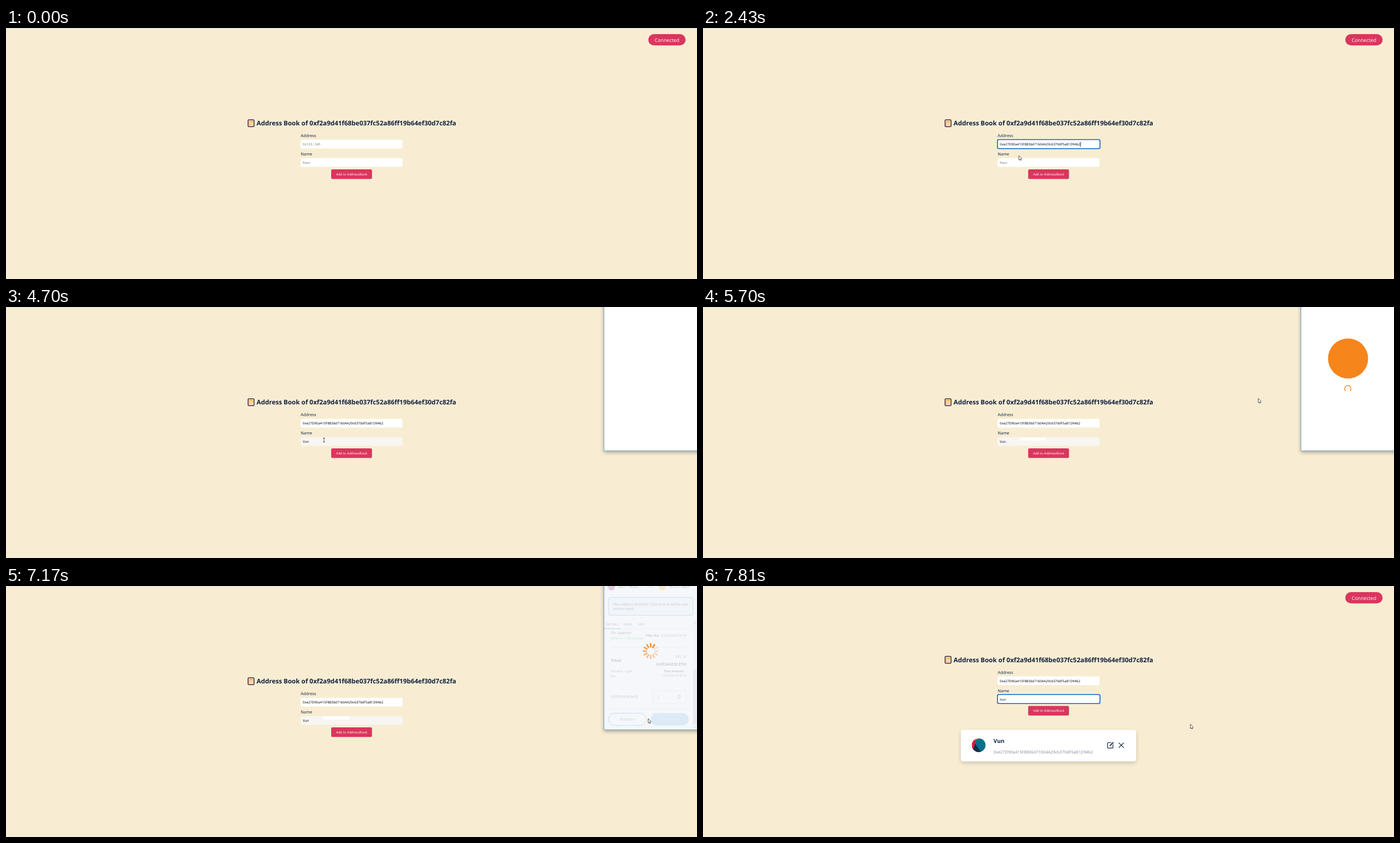
An HTML page with a canvas that plays this animation: 1241 by 451 pixels, repeating every 8 s.

```html
<!DOCTYPE html>
<html lang="en">
<head>
<meta charset="utf-8">
<title>Address book</title>
<style>
  html, body { margin: 0; width: 100%; height: 100%; overflow: hidden; background: #f8edd3; }
  canvas { display: block; }
</style>
</head>
<body>
<canvas id="stage" width="1241" height="451"></canvas>
<script>
const ctx = document.getElementById('stage').getContext('2d');
ctx.textRendering = 'geometricPrecision';

const LOOP = 8000;
const PAGE_FONT = '"Open Sans", sans-serif';
const WALLET_FONT = 'Lato, sans-serif';
const NAVY = '#11213f', PINK = '#da365e', BLUE = '#037dd6', ORANGE = '#f6851b';
const INK = '#24292e', GRAY = '#535a61', LINE = '#d0d3d7';
const OWNER = '0xf2a9d41f68be037fc52a86ff19b64ef30d7c82fa';
const CONTACT = '0xe27D90a415F8836d71b04A29c6370dF5a81D94b2';
const NAME = 'Vun';

const AT = {
  pointer: 1340, focusAddress: 2020, paste: 2290, focusName: 2700, type: 3690,
  submit: 4700, splash: 4850, leaveField: 5130, confirm: 5980, scroll: 6120,
  busy: 6900, close: 7320, added: 7650
};
const KEY_GAP = 150, BLINK = 540;

// Each glide eases the pointer to (x, y).
const GLIDES = [
  { from: 1480, to: 2020, x: 560, y: 208 },
  { from: 2290, to: 2430, x: 567, y: 229 },
  { from: 2430, to: 2700, x: 571, y: 235 },
  { from: 4990, to: 5700, x: 997, y: 164 },
  { from: 5700, to: 6510, x: 1188, y: 224 },
  { from: 6900, to: 7170, x: 1153, y: 238 },
  { from: 7170, to: 7810, x: 875, y: 248 }
];

const between = (t, a, b) => t >= a && t < b;

function ease(t, from, to) {
  const k = Math.max(0, Math.min(1, (t - from) / (to - from)));
  return k * k * (3 - 2 * k);
}

function pointerAt(t) {
  return GLIDES.reduce((p, g) => {
    const k = ease(t, g.from, g.to);
    return { x: p.x + (g.x - p.x) * k, y: p.y + (g.y - p.y) * k };
  }, { x: 161, y: 148 });
}

function at(x, y, paint) {
  ctx.save();
  ctx.translate(x, y);
  paint();
  ctx.restore();
}

// y is the middle of the capital letters
function text(str, x, y, size, color = NAVY, { weight = '', align = 'left', family = PAGE_FONT } = {}) {
  ctx.font = `${weight} ${size}px ${family}`;
  ctx.textAlign = align;
  ctx.fillStyle = color;
  ctx.fillText(str, x, y + size * 0.36);
}

function paintPath(fill, stroke, width = 1) {
  if (fill) { ctx.fillStyle = fill; ctx.fill(); }
  if (stroke) { ctx.strokeStyle = stroke; ctx.lineWidth = width; ctx.stroke(); }
}

function box(x, y, w, h, r, fill, stroke, width) {
  ctx.beginPath();
  ctx.roundRect(x, y, w, h, r);
  paintPath(fill, stroke, width);
}

function shadowBox(x, y, w, h, r, alpha, blur, dy) {
  ctx.save();
  ctx.shadowColor = `rgba(0,0,0,${alpha})`;
  ctx.shadowBlur = blur;
  ctx.shadowOffsetY = dy;
  box(x, y, w, h, r, '#fff');
  ctx.restore();
}

function disc(x, y, r, fill, stroke, width) {
  ctx.beginPath();
  ctx.arc(x, y, r, 0, Math.PI * 2);
  paintPath(fill, stroke, width);
}

function line(x1, y1, x2, y2, color, width = 1) {
  ctx.beginPath();
  ctx.moveTo(x1, y1);
  ctx.lineTo(x2, y2);
  paintPath(null, color, width);
}

function chevron(x, y, angle, size, color) {
  at(x, y, () => {
    ctx.rotate(angle);
    line(-size, size, 0, 0, color, 0.9);
    line(0, 0, size, size, color, 0.9);
  });
}

// A disc split into slanted paper-like layers
function layeredDisc(x, y, r, base, layers, turn) {
  at(x, y, () => {
    disc(0, 0, r, base);
    ctx.clip();
    layers.forEach((color, i) => {
      ctx.rotate(turn);
      box(-2 * r, r * (0.3 + 0.3 * i), 4 * r, 2 * r, 0, color);
    });
  });
}

function input(y, value, hint, focused, caret, fill = '#fff') {
  box(529, y, 183, 15.5, 2, fill);
  if (focused) box(528.8, y - 0.5, 184.2, 16.2, 2.5, '#fff', '#0b63ce', 1.6);
  text(value || hint, 533, y + 8, 5.98, value ? '#000' : '#757575');
  if (caret) {
    const end = 533 + (value ? ctx.measureText(value).width : 0);
    box(end, y + 3.5, 0.8, 9, 0, '#000');
  }
}

function notebook() {
  box(434.7, 164.8, 10.8, 12.6, 1.5, '#fad5b4', '#1d1b2b', 1.3);
  box(435.6, 165.6, 1.5, 11, 0, '#e9a68c');
  box(438.2, 167, 5.2, 2.6, 0.4, '#f7bd35');
}

function form(t) {
  const waiting = between(t, AT.submit, AT.close);
  const onAddress = between(t, AT.focusAddress, AT.focusName);
  const onName = t >= AT.focusName && !waiting;
  const typed = NAME.slice(0, Math.max(0, Math.floor((t - AT.type) / KEY_GAP) + 1));
  const lastKey = (t < AT.type ? AT.focusName : AT.type) + KEY_GAP;
  const caretOn = (t - lastKey) % (2 * BLINK) < BLINK;

  notebook();
  text('Address Book of ' + OWNER, 450, 171, 11.48, NAVY, { weight: 'bold' });
  text('Address', 529.3, 193.6, 7.4);
  text('Name', 529.3, 226.8, 7.4);
  input(201, t >= AT.paste ? CONTACT : '', '0x123...345', onAddress, onAddress);
  input(234, typed, 'Ravo', onName, onName && caretOn && t < AT.submit, waiting ? '#f8f6f3' : '#fff');
  if (waiting && t >= AT.leaveField) box(570, 234, 46, 6, 1, '#fff');
  box(584, 254, 73.3, 17.2, 2.2, PINK);
  text('Add to AddressBook', 620.7, 262.8, 5.93, '#fff', { align: 'center' });
}

function page(t) {
  const added = t >= AT.added;
  at(0, added ? -38.5 : 0, () => form(t));
  box(1153.5, 11, 67, 20.3, 10.1, PINK);
  text('Connected', 1187, 21.5, 8.75, '#fff', { align: 'center' });
  if (added) card();
}

function card() {
  shadowBox(463, 258.3, 315, 57, 4.5, 0.18, 7, 3);
  layeredDisc(495.2, 286, 12.3, '#08708c', ['#123146', '#f0183c', '#f2b705'], 0.95);
  text(NAME, 521.8, 278.8, 10, NAVY, { weight: 'bold' });
  text(CONTACT, 521.8, 298.3, 7.38, '#818a98');
  box(726.5, 281.5, 9.8, 9.7, 1, null, NAVY, 1.2);
  line(730.5, 287.3, 737, 280.8, '#fff', 4);
  line(730.5, 287.3, 737, 280.8, NAVY, 1.8);
  at(751.2, 286.1, () => {
    line(-4.5, -4.5, 4.5, 4.5, NAVY, 1.2);
    line(4.5, -4.5, -4.5, 4.5, NAVY, 1.2);
  });
}

function wallet(t) {
  shadowBox(1074, -6, 180, 264.5, 0, 0.35, 7, 2);
  ctx.save();
  ctx.beginPath();
  ctx.rect(1074, 0, 167, 258.5);
  ctx.clip();
  if (t >= AT.confirm) confirmation(t);
  else if (t >= AT.splash) splash(t);
  ctx.restore();
  box(1073.9, -6, 180, 264.4, 0, null, '#5b8fbf', 0.8);
}

function splash(t) {
  disc(1158.5, 92.5, 36, ORANGE);
  const start = Math.PI * (0.75 + (t - 5700) / 500);
  ctx.beginPath();
  ctx.arc(1158, 146.8, 5.7, start, start + Math.PI * 1.5);
  paintPath(null, ORANGE, 1.4);
}

function label(str, x, y, size, color = INK, options = {}) {
  text(str, x, y, size, color, { family: WALLET_FONT, ...options });
}

function confirmation(t) {
  const busy = t >= AT.busy;
  const progress = ease(t, AT.scroll, 6510);

  layeredDisc(1087.5, 2, 6, '#d5186c', ['#7a2fa0', '#f2710c'], 2);
  label('Acc1 - PlumT...', 1100, 2, 6.3);
  disc(1157.5, 2, 7.5, null, LINE, 0.8);
  line(1154.5, 2, 1160.5, 2, '#8b9299', 0.8);
  chevron(1160.5, 2, Math.PI / 2, 2.3, '#8b9299');
  layeredDisc(1179, 2, 6, '#f5d800', ['#f29b0c'], 2);
  label('0x7Ce...4bb9', 1191, 2, 6.2);

  box(1082, 20.5, 152, 32, 3.5, '#eaf5fc', BLUE, 0.8);
  label('New address detected! Click here to add to your', 1090, 32.7, 6.45);
  label('address book.', 1090, 41, 6.45);
  label('DETAILS', 1078, 69, 5.75);
  label('DATA', 1109, 69, 5.75);
  label('HEX', 1135, 69, 5.75);
  line(1074, 77.5, 1233, 77.5, LINE, 0.8);
  line(1074, 76.7, 1104.5, 76.7, BLUE, 1.2);

  ctx.save();
  ctx.beginPath();
  ctx.rect(1074, 78, 159, 180);
  ctx.clip();
  ctx.translate(0, 150 * (1 - progress) - (busy ? 1 : 0));
  fees();
  nonce();
  buttons(busy);
  ctx.restore();

  box(1233.5, 62, 8, 197, 0, '#f1f1f1');
  box(1234, 72 + 78 * progress, 7, 98.5, 0, '#c1c1c1');
  chevron(1237.6, 65, 0, 2, '#505050');
  chevron(1237.6, 255, Math.PI, 2, '#505050');

  if (busy) {
    box(1074, 0, 167, 259, 0, 'rgba(243,245,249,.8)');
    spokes(t);
  }
}

function fees() {
  const right = { align: 'right' }, bold = { weight: 'bold' }, boldRight = { ...bold, ...right };
  const most = '0.05566378 ETH';
  label('Site suggested', 1086, 85, 6.3, INK, { weight: 'italic' });
  label('Likely in < 30 seconds', 1086, 95, 6.1, '#28a745');
  label('Max fee:', 1149, 89.8, 6.3, INK, bold);
  label(most, 1222, 89.8, 5.9, GRAY, right);
  line(1086, 111, 1222, 111, LINE);
  label('$81.14', 1222, 128, 6.3, GRAY, right);
  label('Totaal', 1086, 134.5, 7.1, '#111', bold);
  label('0.05364232 ETH', 1222, 141.2, 7.05, '#111', boldRight);
  label('Amount + gas', 1086, 154.2, 6.3, GRAY);
  label('fee', 1086, 162.3, 6.3, GRAY);
  label('Max amount:', 1218, 154.2, 6.2, INK, boldRight);
  label(most, 1222, 162.3, 5.9, GRAY, right);
}

function nonce() {
  label('CUSTOM NONCE', 1086, 199.6, 6.1);
  box(1161.5, 189, 60, 23, 3, '#fff', LINE, 0.9);
  label('8', 1169.5, 200.5, 7.3, '#a0a4a8');
  box(1205, 195.5, 8, 9, 1, '#e3e3e3');
  chevron(1209, 197, 0, 1.7, '#777');
  chevron(1209, 203, Math.PI, 1.7, '#777');
}

function buttons(disabled) {
  const center = { align: 'center' };
  line(1074, 221.5, 1233, 221.5, LINE, 0.8);
  box(1082, 229.5, 67.8, 22, 11, '#fff', BLUE, 0.9);
  label('Afwijzen', 1115.8, 240.3, 7.4, BLUE, center);
  if (disabled) ctx.globalAlpha = 0.5;
  box(1158, 229.2, 67.8, 22.4, 11.2, BLUE);
  label('Bevestigen', 1191.8, 240.3, 7.45, '#fff', center);
}

function spokes(t) {
  const lead = Math.floor((t - 7170) / 83) + 1;
  at(1157.8, 117, () => {
    for (let i = 0; i < 12; i++) {
      const age = ((lead - i) % 12 + 12) % 12;
      ctx.globalAlpha = 1 - age * 0.075;
      box(-1.3, -14.5, 2.6, 8, 1.2, ORANGE);
      ctx.rotate(Math.PI / 6);
    }
  });
}

function arrow() {
  line(2.2, 5, 4, 8.8, '#222', 2.2);
  ctx.beginPath();
  ctx.moveTo(0.3, 0.3);
  ctx.lineTo(0.3, 8);
  ctx.lineTo(5.6, 5.7);
  ctx.closePath();
  paintPath('#fff', '#222', 0.75);
  line(2.2, 5, 3.8, 8.3, '#fff', 0.9);
}

function textCursor() {
  line(-1.8, 0.6, 1.8, 0.6, '#333', 0.8);
  line(0, 0.6, 0, 7.8, '#333', 0.8);
  line(-1.8, 7.8, 1.8, 7.8, '#333', 0.8);
}

function pointer(t) {
  if (t < AT.pointer) return;
  const { x, y } = pointerAt(t);
  const overField = between(t, AT.focusAddress, AT.paste) || between(t, AT.focusName, AT.leaveField);
  at(x, y, overField ? textCursor : arrow);
}

function draw(now) {
  const t = now % LOOP;
  box(0, 0, 1241, 451, 0, '#f8edd3');
  box(0, 0, 1241, 1.5, 0, '#e6e4df');
  page(t);
  if (between(t, AT.submit, AT.close)) wallet(t);
  pointer(t);
  requestAnimationFrame(() => draw(performance.now()));
}
draw(0);
</script>
</body>
</html>
```
